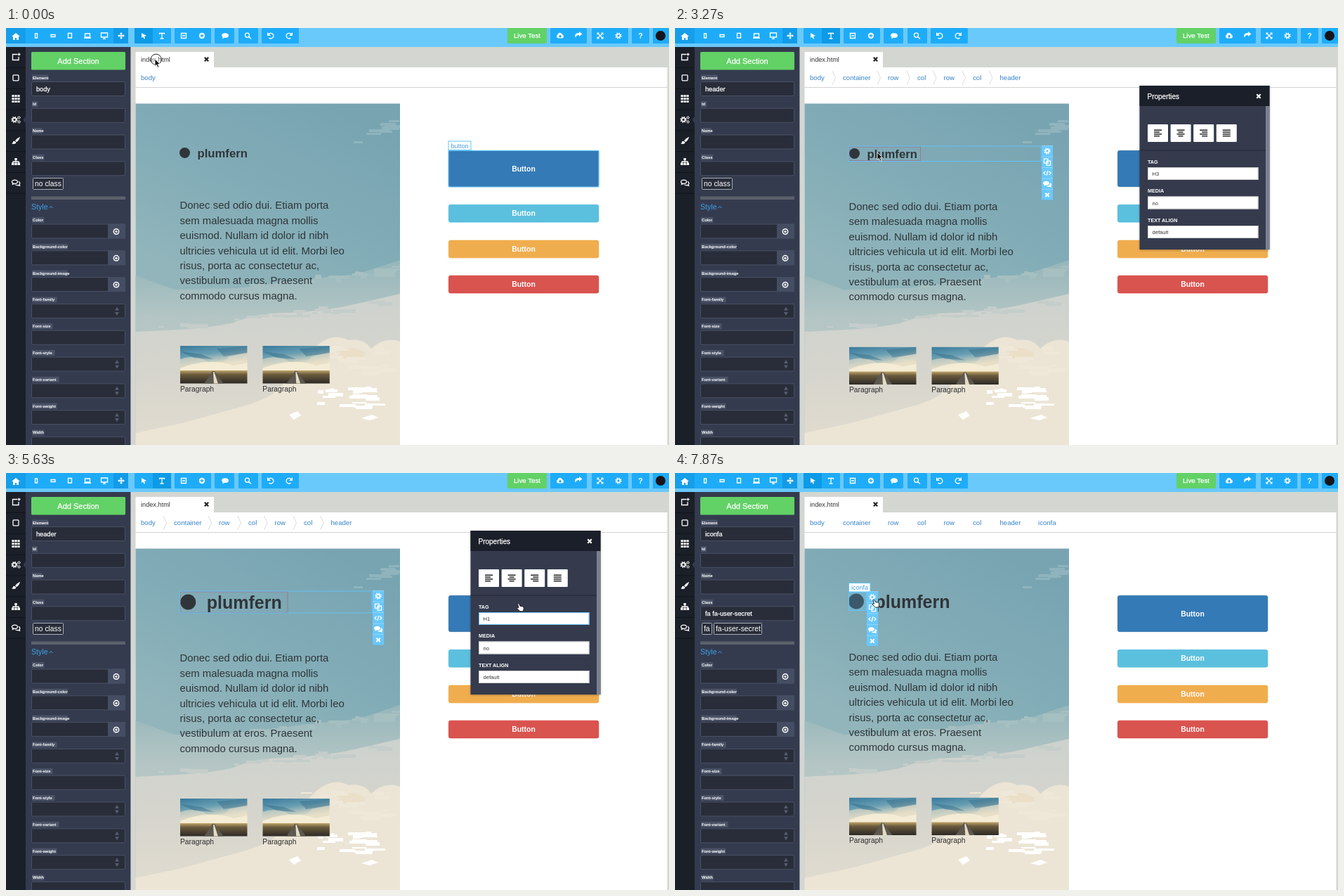
These frames come from a looping animation (944x593 px, 8000 ms). An HTML page:

```html
<!DOCTYPE html>
<html lang="en">
<head>
<meta charset="utf-8">
<title>Page builder</title>
<style>
html, body { margin: 0; width: 100%; height: 100%; overflow: hidden; background: #fff; }
svg { display: block; width: 944px; height: 593px; font-family: "Liberation Sans", Arial, sans-serif; }
text { white-space: pre; }
</style>
</head>
<body>
<svg viewBox="0 0 944 593">
  <defs>
    <linearGradient id="sky" x1=".7" y1="0" x2=".3" y2="1">
      <stop offset="0" stop-color="#78a4b2"/><stop offset=".35" stop-color="#83adb7"/><stop offset=".62" stop-color="#92b5bb"/>
    </linearGradient>
    <linearGradient id="haze" x2="0" y2="1">
      <stop offset="0" stop-color="#95b6bb"/><stop offset=".3" stop-color="#b3c5c4"/><stop offset="1" stop-color="#c8cfcb"/>
    </linearGradient>
    <linearGradient id="cloud" x2="0" y2="1">
      <stop offset="0" stop-color="#cdd2ce"/><stop offset=".5" stop-color="#d6d5cd"/><stop offset="1" stop-color="#e2dccf"/>
    </linearGradient>
    <linearGradient id="thumbSky" x2=".25" y2="1">
      <stop offset="0" stop-color="#37799d"/><stop offset=".3" stop-color="#6a9fb2"/><stop offset=".6" stop-color="#f0e4c8"/>
    </linearGradient>
    <linearGradient id="field" x2="0" y2="1">
      <stop offset="0" stop-color="#c0a66c"/><stop offset=".3" stop-color="#6b5b3d"/><stop offset="1" stop-color="#292725"/>
    </linearGradient>
    <linearGradient id="choice" x2="0" y2="1">
      <stop offset="0" stop-color="#4c7cf8"/><stop offset="1" stop-color="#1443e6"/>
    </linearGradient>
    <pattern id="hatch" width="4" height="4" patternUnits="userSpaceOnUse">
      <path d="M-1 1L1-1M0 4L4 0M3 5L5 3" stroke="#9bd8fa" stroke-width=".9"/>
    </pattern>
    <clipPath id="photo"><path d="M184.500 107.500H561V593H184.500z"/></clipPath>
    <clipPath id="thumbBox"><path d="M0 0H95.500V53.500H0z"/></clipPath>
    <filter id="shadow"><feDropShadow dx="0" dy="1" stdDeviation="1.500" flood-opacity=".3"/></filter>
  </defs>
  <g id="stage"></g>
</svg>
<script>
const BLUE = '#62c4fa', LINK = '#3583c9', PANEL = '#343b4e', INPUT = '#282d39';

const rect = (x, y, w, h, fill, more = '') => `<rect x="${x}" y="${y}" width="${w}" height="${h}" fill="${fill}" ${more}/>`;
const frame = (x, y, w, h, color = BLUE, more = '') => rect(x + .5, y + .5, w - 1, h - 1, 'none', `stroke="${color}" ${more}`);
const path = (d, fill, more = '') => `<path d="${d}" fill="${fill}" ${more}/>`;
const disc = (x, y, r, fill, more = '') => `<circle cx="${x}" cy="${y}" r="${r}" fill="${fill}" ${more}/>`;
const at = (x, y, body, more = '') => `<g transform="translate(${x} ${y})" ${more}>${body}</g>`;
// y is the middle of the line
const text = (x, y, s, size, fill = '#fff', more = '') =>
  `<text x="${x}" y="${y + size * .35}" font-size="${size}" fill="${fill}" ${more}>${s}</text>`;
const BOLD = 'font-weight="bold" ', MID = 'text-anchor="middle" ', MEDIUM = 'stroke="#fff" stroke-width=".250" ';
const line = d => path(d, 'none', 'stroke="currentColor" stroke-width="1.3"');
const solid = d => path(d, 'currentColor');

const GEAR = disc(0, 0, 2.5, 'none', 'stroke="currentColor" stroke-width="1.700"') +
  disc(0, 0, 3.900, 'none', 'stroke="currentColor" stroke-width="1.500" stroke-dasharray="1.600 1.463"');
const smallGear = y => at(4.5, y, `<g transform="scale(.5)">${GEAR}</g>`);
const ICONS = {
  home: solid('M0-5L6 0H4V5H1V2H-1V5H-4V0H-6z'),
  phone: line('M-1.500-3H1.500V3H-1.500z'),
  phoneWide: line('M-3-1.500H3V1.500H-3z'),
  tablet: line('M-2.500-3.500H2.500V3H-2.500zM-1 3H1'),
  laptop: line('M-3.500-3H3.500V2H-3.500zM-5 3.300H5'),
  desktop: line('M-4.500-4H4.500V2H-4.500zM0 2V4M-2 4.300H2'),
  move: line('M-4 0H4M0-4V4') + solid('M0-5L2-2.500H-2zM0 5L2 2.500H-2zM-5 0L-2.500-2V2zM5 0L2.500-2V2z'),
  arrow: solid('M-3-4L4 0L1 1L2 4L.500 4.500L-.800 1.500L-3 3z'),
  type: line('M-3.500-2V-3.500H3.500V-2M0-3.500V3M-2.500 4H2.500'),
  box: line('M-3.500-3.500H3.500V3.500H-3.500zM-2 0H2'),
  plus: disc(0, 0, 4.200, 'currentColor') + path('M-2.500 0H2.500M0-2.500V2.500', 'none', 'stroke="#1caaf6" stroke-width="1.300"'),
  comment: solid('M-5-.500C-5-5 5-5 5-.500C5 3 1 3.200-1 2.800L-4 4.500L-3.300 2Q-5 1-5-.500z'),
  comments: solid('M-6-1C-6-5 3-5 3-1C3 1.500-1 2-2.500 1.700L-5 3L-4.300 1Q-6 .500-6-1zM4-1.500C7 0 6.500 2 5.200 3L6 5L3 4Q0 4.500-1.500 3Q4 3 4-1.500z'),
  chat: line('M-5.500-1C-5.500-4.500 2.500-4.500 2.500-1C2.500 1.500-1 2-2.500 1.500L-4.500 2.500L-4 1Q-5.500 .500-5.500-1zM4-1.500C6.500 0 6 2 5 3L5.500 4.500L3 3.700Q1 4-.500 3.200'),
  search: line('M1.500-.800A3 3 0 1 1-4.500-.800A3 3 0 1 1 1.500-.800M.800 1.500L4 4.500'),
  undo: line('M-3-2A3.800 3.800 0 1 1-2.500 3') + solid('M-5-5V0H0z'),
  redo: line('M3-2A3.800 3.800 0 1 0 2.500 3') + solid('M5-5V0H0z'),
  cloud: solid('M-3 3.500A2.700 2.700 0 0 1-3.500-1.500A3.300 3.300 0 0 1 3-1.700A2.700 2.700 0 0 1 3 3.500zM-1-1V.500H-2.500L0 3L2.500 .500H1V-1z'),
  share: solid('M1-5L5.500-1.500L1 2V0Q-3-.500-4 4Q-7-3 1-3z'),
  expand: line('M-3.500-3.500L3.500 3.500M3.500-3.500L-3.500 3.500') + solid('M-4.500-4.500H-1L-4.500-1zM4.500-4.500V-1L1-4.500zM-4.500 4.500V1L-1 4.500zM4.500 4.500H1L4.500 1z'),
  gear: GEAR,
  gears: at(-2, 0, GEAR) + smallGear(-3) + smallGear(3),
  addBox: line('M2-3.500H-4.500V4.500H4V0M2.500-3.500H6.500M4.500-5.500V-1.500'),
  square: line('M-4-3Q-4-4-3-4H3Q4-4 4-3V3Q4 4 3 4H-3Q-4 4-4 3z'),
  grid: [-4, 0, 4].map(y => [-4, 0, 4].map(x => rect(x - 1.600, y - 1.400, 3.200, 2.800, 'currentColor')).join('')).join(''),
  brush: solid('M6-5.500Q2-4-1 0L1 2Q5-1 6-5.500zM-1.500 .800Q-4 0-4.500 3L-6 4Q-1 6 .500 2.700z'),
  tree: line('M0-3V1M-4 2V0H4V2') + solid('M-1.700-5H1.700V-2H-1.700zM-6 1.500H-2.500V5H-6zM-1.700 1.500H1.700V5H-1.700zM2.500 1.500H6V5H2.500z'),
  copy: line('M-4.500-4.500H1V1.500H-4.500zM-1-1.500H4.500V4.500H-1z'),
  code: line('M-2.500-2.500L-5 0L-2.500 2.500M2.500-2.500L5 0L2.500 2.500M1-3.500L-1 3.500'),
  cross: path('M-2.700-2.700L2.700 2.700M2.700-2.700L-2.700 2.700', 'none', 'stroke="currentColor" stroke-width="2.100"'),
  target: disc(0, 0, 3.700, 'none', 'stroke="currentColor" stroke-width="1.500"') + disc(0, 0, 1.600, 'currentColor')
};
const icon = (name, x, y, color = '#fff') => at(x, y, ICONS[name], `color="${color}"`);
const iconRow = items => items.map(([name, x, y = 11]) => icon(name, x, y)).join('');

function topBar(editing) {
  const groups = [[0, 174], [183, 52], [240, 52], [297, 28], [331, 28], [364, 53], [775, 52], [834, 52], [891, 25]];
  return rect(0, 0, 944, 27, '#69c9fb') +
    groups.map(([x, w]) => rect(x, 0, w, 22, '#1eacf8', 'rx="1.500"')).join('') +
    rect(0, 0, 28, 22, '#159eea') + rect(153, 0, 21, 22, '#129be8') + rect(editing ? 209 : 183, 0, 26, 22, '#0d9ae6') +
    iconRow([['home', 14, 12], ['phone', 43], ['phoneWide', 67], ['tablet', 91], ['laptop', 116], ['desktop', 140], ['move', 164],
      ['arrow', 196], ['type', 222], ['box', 253], ['plus', 279], ['comment', 312], ['search', 345], ['undo', 377], ['redo', 403],
      ['cloud', 789], ['share', 815, 10], ['expand', 846], ['gear', 872]]) +
    text(903.5, 11, '?', 10.5, '#fff', BOLD + MID) +
    rect(714, 0, 56, 22, '#62d166', 'rx="1.500"') + text(742, 11, 'Live Test', 9.7, '#fff', MID + MEDIUM) +
    rect(921, 0, 23, 22, '#1eacf8') + disc(932, 11, 7, '#17151a');
}

function rail() {
  const names = ['addBox', 'square', 'grid', 'gears', 'brush', 'tree', 'chat'];
  return rect(0, 27, 28, 566, '#1b1f28') +
    names.map((name, i) => icon(name, 14, 41 + i * 29.8) + rect(0, 56 + i * 29.8, 28, 1, '#11141b')).join('');
}

function sidebar(element, cssClass, tags) {
  const field = (label, y, value = '', kind) =>
    rect(37, y - 4, label.length * 3.05 + 2, 8, '#4b5367') + text(38, y, label, 5.8, '#fff', BOLD) +
    rect(36.5, y + 6, 133, 20, INPUT, 'stroke="#4a5165" rx="1.500"') + text(43, y + 16, value, 9.2, '#fff', MEDIUM) +
    (kind == 'color' ? rect(145, y + 5.5, 25, 21, '#454d62') + icon('target', 157, y + 16.5) : '') +
    (kind == 'list' ? path(`M155 ${y + 15}l3-5l3 5zM155 ${y + 17.5}l3 5l3-5z`, '#555d70') : '');
  return rect(28, 27, 149.5, 566, PANEL) + path('M28.500 125l-4 5.500l4 5.500z', PANEL) +
    rect(36, 34, 134, 25.5, '#62d166', 'rx="1.500"') + text(103, 47, 'Add Section', 11, '#fff', MID + MEDIUM) +
    field('Element', 70.5, element) + field('Id', 108.3) + field('Name', 146) + field('Class', 183.8, cssClass) +
    tags.map(([x, w, s]) => rect(x + .5, 213.5, w, 16, INPUT, 'stroke="#a9adb6" rx="1"') + text(x + 3, 221.8, s, 10.35)).join('') +
    rect(36, 239.5, 134, 4.5, '#5c626c') + text(36, 254.5, 'Style', 10.6, '#3da2ea') +
    path('M61.500 256l2.500-2.500l2.500 2.500', 'none', 'stroke="#3da2ea"') +
    ['Color', 'Background-color', 'Background-image', 'Font-family', 'Font-size', 'Font-style', 'Font-variant', 'Font-weight', 'Width']
      .map((s, i) => field(s, 273 + i * 37.8, '', i < 3 ? 'color' : i == 4 || i == 8 ? '' : 'list')).join('');
}

function tabs(crumbs) {
  const starts = [192, 239, 303, 345, 382.5, 424, 462.5, 517];
  const chevrons = crumbs.length == 7;
  return rect(177.5, 26, 766.5, 567, '#d3d6d1') + rect(184.5, 56, 757, 537, '#fff') + rect(184.5, 34, 111.5, 23, '#fff') +
    text(192, 44.5, 'index.html', 9.2, '#333') + icon('cross', 285.5, 44.5, '#222') + rect(184.5, 84, 757, 1, '#d2d2d2') +
    crumbs.map((s, i) => text(starts[i], 71, s, 9.6, LINK) +
      (chevrons && i ? path(`M${starts[i] - 15} 61l4.500 10l-4.500 10`, 'none', 'stroke="#ddd"') : '')).join('');
}

function landscape() {
  let seed = 7, streaks = '';
  const random = () => (seed = seed * 16807 % 2147483647) / 2147483647;
  const scatter = (count, x, y, w, h, slope, color) => {
    for (let i = 0; i < count; i++) {
      const u = random();
      streaks += rect(Math.round(x + u * w), Math.round(y + u * slope + random() * h), Math.round(6 + random() * 24), 2 + Math.round(random() * 4), color);
    }
  };
  scatter(16, 495, 150, 55, 12, -22, '#8fb4bd');
  scatter(24, 330, 366, 220, 10, -30, '#a6bfc0');
  scatter(22, 190, 426, 340, 8, -40, '#c4cdca');
  scatter(20, 420, 448, 120, 45, 0, '#efe8d8');
  scatter(22, 440, 514, 75, 30, -6, '#fff');
  return `<g clip-path="url(#photo)">` + rect(184, 107, 377, 486, 'url(#sky)') +
    path('M184 352L240 372L330 370L430 357L500 350L561 330V600H184z', 'url(#haze)') +
    path('M184 432L225 430Q280 428 320 420Q360 404 400 405Q460 402 500 392L561 378V600H184z', 'url(#cloud)') +
    path('M184 576L250 562L330 540Q390 525 400 496Q425 480 432 462Q460 430 488 444Q508 440 520 456Q540 438 561 446V600H184z', '#ece5d6') +
    path('M470 462Q490 448 512 462L508 472L478 470z', '#ebdfc8') + streaks +
    path('M403 550l12-5l5 6l-10 6zM506 555l15-5l9 4l-12 4zM452 516l14-4l3 5z', '#fff') + '</g>';
}

const thumb = (x, y) => at(x, y, '<g clip-path="url(#thumbBox)">' + rect(0, 0, 95.5, 53.5, 'url(#thumbSky)') +
  path('M0 19Q20 12 38 22T70 15L96 9V34H0z', '#e3dcc8', 'opacity=".600"') + path('M0 8L30 12L48 19L20 17zM52 4L96 0V10L62 15z', '#28627f', 'opacity=".400"') +
  path('M14 27Q48 18 76 28L96 24V36H0V32z', '#f8efd8', 'opacity=".850"') + rect(0, 35, 96, 19, 'url(#field)') +
  path('M46 36H49L62 54H34z', '#5d5850') + path('M47 37H48.500L54 54H48z', '#e6dcc2') + '</g>') +
  text(x, y + 61, 'Paragraph', 10.3, '#2d2d2d');

const PARAGRAPH = ['Donec sed odio dui. Etiam porta', 'sem malesuada magna mollis', 'euismod. Nullam id dolor id nibh', 'ultricies vehicula ut id elit. Morbi leo',
  'risus, porta ac consectetur ac,', 'vestibulum at eros. Praesent', 'commodo cursus magna.'];
const BUTTONS = [['#337ab7', '#2e6da4', 174, 52], ['#5bc0de', '#46b8da', 251, 25.5], ['#f0ad4e', '#eea236', 301.7, 25.5], ['#d9534f', '#d43f3a', 351.8, 25.5]];

function page(shift, big, iconX, iconY) {
  return landscape() + disc(iconX, iconY, big ? 11 : 7.5, '#30353a') +
    text(big ? iconX + 26.5 : iconX + 18, iconY + .8, 'plumfern', big ? 25 : 16.7, '#303539', BOLD) +
    PARAGRAPH.map((s, i) => text(247.5, 252 + shift + i * 21.45, s, 14.9, '#2f3538')).join('') +
    thumb(248, 452 + shift) + thumb(365.3, 452 + shift) +
    BUTTONS.map(([fill, edge, y, h]) => rect(630.4, y + .4, 213.4, h - .8, fill, `rx="2.500" stroke="${edge}" stroke-width=".800"`) +
      text(737, y + h / 2, 'Button', 10.4, '#fff', BOLD + MID)).join('');
}

const label = (x, y, w, s) => rect(x + .5, y + .5, w - 1, 12.5, '#fff', `stroke="${BLUE}"`) + text(x + 4, y + 7, s, 9, '#4aa0d8');
const tools = (x, y) => rect(x, y, 16, 77.5, '#69c8fb') +
  ['gear', 'copy', 'code', 'comments', 'cross'].map((name, i) => rect(x, y + i * 15.6, 16, .6, '#a9e0fd') + icon(name, x + 8, y + 8 + i * 15.6)).join('');

function properties(tag, focused) {
  const lines = [[0, 3, 0, 3], [0, 2, 0, 2], [0, 3, 0, 3], [0, 0, 0, 0]];
  const align = lines.map((cuts, i) => {
    const x = 673 + i * 32.6;
    return rect(x, 137, 29, 25, '#fff', 'rx="1"') + cuts.map((cut, row) =>
      rect(x + 9 + (i == 1 ? cut : i == 2 ? cut : 0), 144.5 + row * 2.8, 11 - cut * (i == 1 ? 2 : 1), 1.5, '#222')).join('');
  }).join('');
  const select = (y, name, value, border) => text(673, y, name, 7.2, '#fff', BOLD) +
    rect(673, y + 8, 157.5, 18, '#fff') + frame(673, y + 8, 157.5, 18, border) + text(679.5, y + 17.5, value, 7.6, '#333');
  return '<g filter="url(#shadow)">' + rect(661.5, 82, 185, 233, PANEL) + '</g>' + rect(661.5, 82, 185, 29, '#1b1f29') +
    text(672.5, 97, 'Properties', 10, '#fff', MEDIUM) + icon('cross', 831, 97) + rect(841, 111, 5.500, 204, '#79818f') + align +
    rect(661.5, 173.5, 179.5, 1, '#232836') +
    select(190, 'TAG', tag, focused ? '#66bdf0' : '#ccc') + select(231.5, 'MEDIA', 'no', '#ccc') + select(273, 'TEXT ALIGN', 'default', '#ccc');
}

const dropdown = active => '<g filter="url(#shadow)">' + rect(665.5, 174.5, 157.5, 72.5, '#fff', 'rx="2"') + '</g>' +
  [1, 2, 3, 4, 5, 6].map((level, i) => {
    const y = 182 + i * 11.1;
    return rect(665.5, y - 5.5, 157.5, 11.1, i == active ? 'url(#choice)' : i % 2 ? '#fff' : '#f6f6f6') +
      text(681, y, 'H' + level, 7.8, i == active ? '#fff' : '#222');
  }).join('') + path('M670 204.500l2 2.500l3.500-6', 'none', 'stroke="#222" stroke-width="1.300"');

// step, x, y of the pointer tip
const TRACK = [[4, 212, 44], [12, 288, 183], [13, 288, 177], [24, 288, 177], [29, 734, 206], [30, 734, 206], [33, 728.5, 186],
  [40, 728.5, 185], [48, 256.5, 185], [51, 256.5, 185], [52, 270, 184], [53, 282, 179.5]];

function pointer(step) {
  const next = TRACK.findIndex(key => key[0] >= step);
  const [s1, x1, y1] = TRACK[next];
  const [s0, x0, y0] = TRACK[Math.max(next - 1, 0)];
  const u = s1 > s0 ? (step - s0) / (s1 - s0) : 1, eased = u * u * (3 - 2 * u);
  const x = x0 + (x1 - x0) * eased, y = y0 + (y1 - y0) * eased;
  const hand = step == 53 || step >= 37 && step <= 40;
  const ring = { 0: 1, 1: .4, 18: 1, 20: 1 }[step] || 0;
  const shape = hand
    ? path('M0 1Q1.200-.500 2.200 1.200L3.400 4L7 4.500Q9 5 8.700 7.500L8 11.500H3.500L-1 7.500Q-1 6 1.500 6.500z', '#fff', 'stroke="#111" stroke-width=".900"')
    : path('M0 0V10.500L2.400 8.300L4.200 12.300L6 11.500L4.200 7.500H7.500z', '#111', 'stroke="#fff" stroke-width=".800"');
  return disc(x + 1.700, y + .700, 7.600, 'rgba(255,255,255,.2)', `stroke="#222" opacity="${ring}"`) + at(x, y, shape);
}

function scene(step) {
  const between = (a, b) => step >= a && step < b;
  const when = (shown, body) => shown ? body : '';
  const selected = between(19, 49), editing = between(21, 49), big = step >= 36, picked = step >= 49;
  const crumbs = ['body', 'container', 'row', 'col', 'row', 'col', 'header', 'iconfa'].slice(0, picked ? 8 : selected ? 7 : 1);
  const shift = picked ? 9.5 : big ? 11 : editing ? 1.5 : 0;
  const iconX = picked ? 258 : big ? 259.3 : editing ? 255.5 : 254.5;
  const iconY = picked ? 182.5 : big ? 183.5 : editing ? 178.5 : 177.5;
  return tabs(crumbs) + page(shift, big, iconX, iconY) +
    when(step < 13, label(629.5, 160.5, 33, 'button') + frame(629.5, 174, 215, 52.5)) +
    when(between(13, 19), rect(247, 188, 273, 38, 'rgba(70,120,135,.07)') + frame(247, 167.5, 274, 21) + label(247, 154.5, 35, 'header')) +
    when(editing, frame(247.5, 168.5, big ? 154 : 102.5, big ? 30.5 : 20.5, '#b9546a', 'stroke-width=".800" opacity=".700"')) +
    when(selected, frame(246.5, 167.5, 275, big ? 32 : 22.5) + tools(522, 167)) +
    when(between(28, 36), rect(560, 93, 377, 14, 'url(#hatch)') + frame(560, 107, 377, 490) + label(560.5, 93.5, 18, 'div')) +
    when(step == 48, rect(247, 168, 154, 31, 'rgba(60,90,130,.12)') + frame(247.5, 169.5, 24, 28) + label(247.5, 156.5, 32, 'iconfa')) +
    when(picked, rect(247.5, 169.5, 25, 26, 'rgba(98,196,250,.25)') + frame(247, 169, 26, 27) + label(247, 156, 31.5, 'iconfa') + tools(273, 168.5)) +
    when(editing, properties(big ? 'H1' : 'H3', step >= 30)) +
    when(between(30, 36), dropdown(step < 31 ? 2 : step < 33 ? 1 : 0)) +
    topBar(editing) + rail() +
    (picked ? sidebar('iconfa', 'fa fa-user-secret', [[38, 14, 'fa'], [55, 68, 'fa-user-secret']])
            : sidebar(selected ? 'header' : 'body', '', [[38, 43, 'no class']])) +
    pointer(step);
}

const LOOP = 8000, STEP = 148.4, LEAD = 10;
const stage = document.getElementById('stage');
const start = performance.now();
let shown = -1;
function tick() {
  const t = (performance.now() - start) % LOOP;
  const step = Math.min(53, Math.floor((t + LEAD) / STEP));
  if (step !== shown) stage.innerHTML = scene(shown = step);
  requestAnimationFrame(tick);
}
tick();
</script>
</body>
</html>
```
